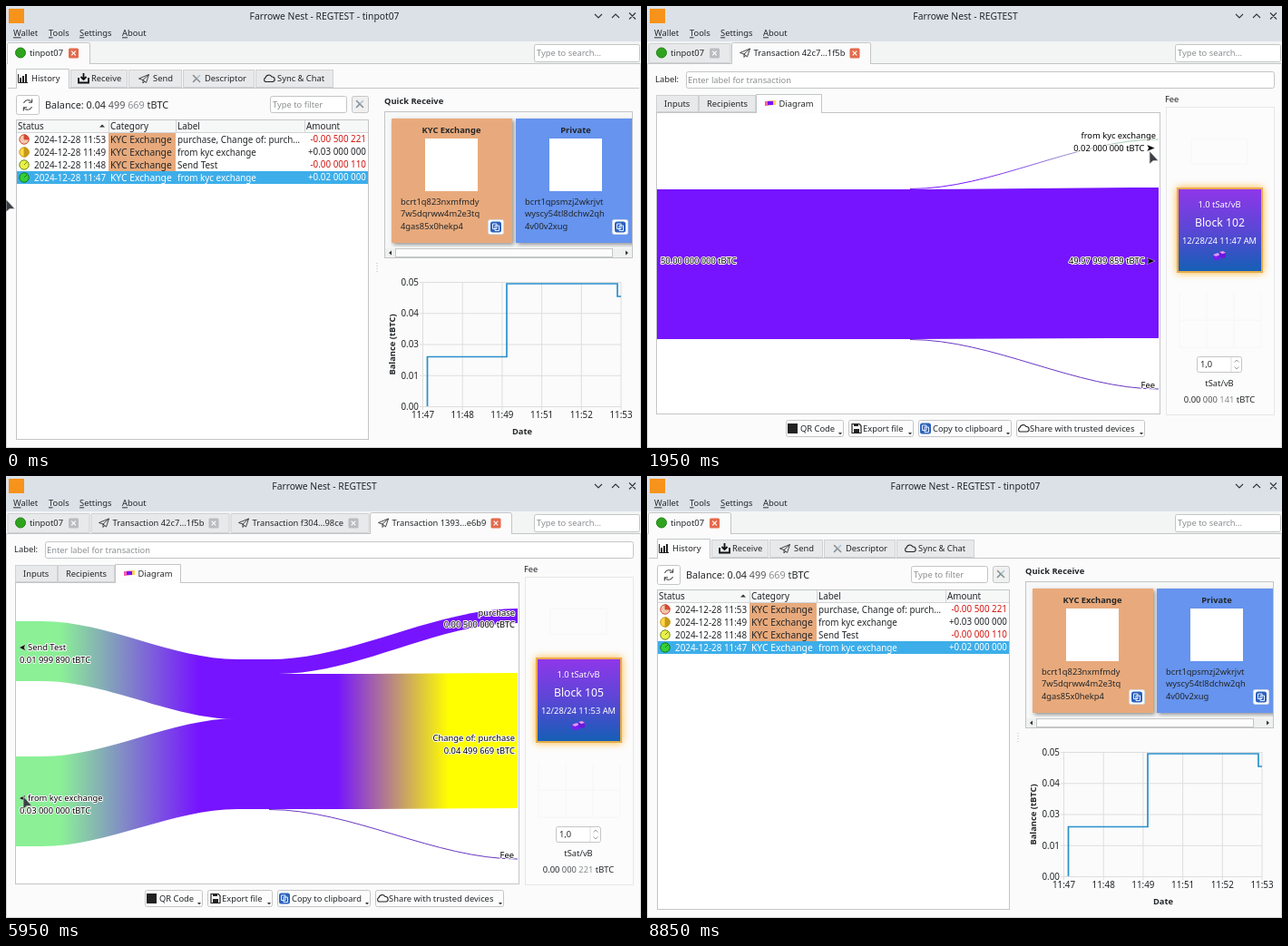
Write an HTML page that moves like this. It is 700 px wide and 487 px high and loops after 9 s.

```html
<!DOCTYPE html>
<html lang="en">
<head>
<meta charset="utf-8">
<title>Wallet walkthrough</title>
<style>
html, body { margin: 0; width: 100%; height: 100%; overflow: hidden; background: #fbfbfb }
svg { display: block }
text { font: 9.35px "Noto Sans", "Open Sans", sans-serif; fill: #232629; white-space: pre }
.m { text-anchor: middle } .e { text-anchor: end }
.b { font-weight: 700 }
.n { font-size: 9.85px } .l { font-size: 10.3px } .xl { font-size: 12.2px } .bal { font-size: 10.8px }
.g { fill: #8b8e91 } .w { fill: #fff } .r { fill: #d2140f }
.h { fill: #000; stroke: #fff; stroke-width: 2px; paint-order: stroke; stroke-linejoin: round }
.block { filter: drop-shadow(0 0 4px #ffb52e) }
.card { filter: drop-shadow(2px 2px 2px #0006) }
</style>
</head>
<body>
<svg width="700" height="487" viewBox="0 0 700 487">
  <defs>
    <linearGradient id="block" x2="0" y2="1"><stop stop-color="#9136ea"/><stop offset=".5" stop-color="#5a47d5"/><stop offset="1" stop-color="#1260b4"/></linearGradient>
    <g id="plane" fill="none" stroke="#333" stroke-width=".9" stroke-linejoin="round"><path d="M-5.500 0L5.500-4.500 2.500 4.500-1 1.500ZM-1 1.500L5.500-4.500M-1 1.500V5L.8 3"/></g>
    <g id="cubes"><path d="M-7-1L-2-3 1-1V4L-4 5-7 3Z" fill="#7a1cf0"/><path d="M-7-1L-2-3 1-1-4 1Z" fill="#d79cf5"/><path d="M0-4L4-5 7-3V2L3 3 0 1Z" fill="#6a18dc"/><path d="M0-4L4-5 7-3 3-2Z" fill="#ee9de4"/></g>
    <g id="copy"><rect x="-6" y="-6" width="12" height="12" rx="2.500" fill="#2c62bd"/><path d="M-3.500-3.500H1V2H-3.500ZM-1-1.500H3.500V4H-1Z" fill="#2c62bd" stroke="#e6eeff"/></g>
    <g id="tools" stroke-linecap="round" stroke-width="1.600"><path d="M-3.500-3.500L3.500 3.500" stroke="#8c8c8c"/><path d="M3.500-3.500L0 0" stroke="#a9c0d4"/><path d="M0 0L-3.500 3.500" stroke="#7d8c98"/></g>
    <path id="cloud" d="M-4 3.500A2.500 2.500 0 0 1-4-1A3.800 3.800 0 0 1 3-2A2.800 2.800 0 0 1 4 3.500Z" fill="none" stroke="#222" stroke-width="1.100"/>
  </defs>
  <g id="scene"></g>
  <path id="cursor" d="M0 0V14L4 10.500 9.500 10.300Z" fill="#3b3f44" stroke="#d8dadc" stroke-width=".7"/>
</svg>
<script>
const LOOP = 9000, APP = 'Farrowe Nest', WALLET = 'tinpot07';
const PAGE = '#fbfbfb', PURPLE = '#7614ff', GREEN = '#8bf096', YELLOW = '#ffff00', TAN = '#e8aa7c', EDGE = '#c3c5c7', BLUE = '#3daee9';

// [start ms, open transactions, recipients page shown]; the last open tab is active
const stages = [[0, 0], [400, 1, true], [1250, 1], [2250, 2], [4200, 3], [6100, 4], [7500, 3], [8050, 2], [8250, 1], [8450, 0]];
const pointer = [[0, 0, 213], [350, 61, 190], [500, 61, 190], [1150, 160, 105], [1300, 160, 105], [1900, 554, 160],
  [2400, 554, 160], [3150, 534, 251], [3850, 550, 250], [4850, 550, 250], [5750, 19, 353], [6950, 19, 353],
  [7400, 540, 48], [8050, 540, 48], [8220, 382, 48], [8420, 228, 48], [8800, -15, 190], [9000, -15, 190]];
const txs = [
  { id: '42c7...1f5b', x: 93, w: 154, block: 102, time: '11:47', fee: 141, draw: () => bulk('50.00 000 000', '0.02 000 000', '49.97 999 859', true) },
  { id: 'f304...98ce', x: 247, w: 154, block: 103, time: '11:48', fee: 110, draw: sendTest },
  { id: '1393...e6b9', x: 401, w: 157, block: 105, time: '11:53', fee: 221, draw: purchase },
  { id: 'a92a...101f', x: 558, w: 155, block: 104, time: '11:49', fee: 141, draw: () => bulk('49.97 999 859', '0.03 000 000', '49.94 999 718', false) }
];

// y is the vertical middle of the text
const T = (x, y, s, cls = '') => `<text x="${x}" y="${y + 3.4}" class="${cls}">${s}</text>`;
const P = (d, fill = 'none', stroke = 'none', w = 1) => `<path d="${d}" fill="${fill}" stroke="${stroke}" stroke-width="${w}"/>`;
const R = (x, y, w, h, fill, stroke = 'none', r = 0) => {
  const o = stroke == 'none' ? 0 : .5;
  return `<rect x="${x + o}" y="${y + o}" width="${w - 2 * o}" height="${h - 2 * o}" rx="${r}" fill="${fill}" stroke="${stroke}"/>`;
};
const C = (x, y, r, fill, stroke = 'none') => `<circle cx="${x}" cy="${y}" r="${r}" fill="${fill}" stroke="${stroke}"/>`;
const use = (id, x, y) => `<use href="#${id}" x="${x}" y="${y}"/>`;
const field = (x, y, w, h, edge = EDGE, fill = '#fff') => R(x, y, w, h, fill, edge, 2);
const sats = s => {
  const [a, b, c] = s.split(' ');
  return `${a} <tspan fill="#55585b">${b}</tspan> <tspan fill="#8b8e91">${c}</tspan> tBTC`;
};
const spin = (x, y, h) => P(`M${x - 6} ${y - h / 2 + 1}V${y + h / 2 - 1}`, 'none', '#ddd') +
  P(`M${x - 2.5} ${y - 2.5}L${x} ${y - 5} ${x + 2.5} ${y - 2.5}M${x - 2.5} ${y + 2.5}L${x} ${y + 5} ${x + 2.5} ${y + 2.5}`, 'none', '#999', .9);
const swoop = (x0, y0, x1, y1) => `C${(2 * x0 + x1) / 3} ${y0} ${(x0 + 2 * x1) / 3} ${y1} ${x1} ${y1}`;
const gradient = (id, from, to, x1, x2, y1 = 0, y2 = 0) =>
  `<linearGradient id="${id}" gradientUnits="userSpaceOnUse" x1="${x1}" y1="${y1}" x2="${x2}" y2="${y2}"><stop stop-color="${from}"/><stop offset="1" stop-color="${to}"/></linearGradient>`;

function closeBox(x, active) {
  return R(x - 5.5, 46.5, 11, 11, active ? '#e26b4c' : '#babdc0', 'none', 1.5) +
    P(`M${x - 2.3} 49.700l4.600 4.600m0-4.600l-4.600 4.600`, 'none', '#fff', 1.2);
}

function mainTab(x, w, active) {
  return active
    ? P(`M${x} 64V42Q${x} 40.500 ${x + 2} 40.500H${x + w - 2}Q${x + w} 40.500 ${x + w} 42V64`, PAGE, EDGE)
    : R(x, 41, w, 22, '#e8e9ea', '#cfd1d3', 1);
}

function frame(n) {
  const menus = [[8, 'Wallet'], [47, 'Tools'], [81, 'Settings'], [128, 'About']];
  let s = R(0, 0, 700, 487, PAGE) + R(0, 0, 700, 39, '#dce1e8') + R(0, 39, 700, 24, '#f3f4f4') +
    R(3, 3, 17, 16, '#f7931a') +
    T(351, 11.5, `${APP} - REGTEST${n ? '' : ' - ' + WALLET}`, 'l m') +
    P('M649 9l4 4 4-4M668 13l4-4 4 4M687 7.500l7 7m0-7l-7 7', 'none', '#333', 1.1);
  for (const [x, m] of menus) s += T(x, 30, `<tspan text-decoration="underline">${m[0]}</tspan>${m.slice(1)}`);
  s += P('M0 63.500H700', 'none', EDGE);

  const shift = n == 4 ? -155.5 : 0;
  let tabs = mainTab(1.5, 91, !n) + C(16, 51.5, 5.5, '#2fa31d', '#23861a') + T(26, 52, WALLET) + closeBox(74.5, !n);
  txs.slice(0, n).forEach((tx, i) => {
    const active = i == n - 1;
    tabs += mainTab(tx.x + .5, tx.w - 1, active) + use('plane', tx.x + 15, 51.5) +
      T(tx.x + 24.5, 52, 'Transaction ' + tx.id) + closeBox(tx.x + tx.w - 18, active);
  });
  s += `<svg width="558" height="65"><g transform="translate(${shift})">${tabs}</g></svg>`;
  if (n == 4) s += R(558, 41, 10, 21, '#f5f5f5', EDGE) + R(568, 41, 10, 21, '#f5f5f5', EDGE) + P('M565 49l-3 3 3 3ZM571 49l3 3-3 3Z', '#333');
  return s + field(582, 42, 117, 20) + T(585, 52, 'Type to search...', 'g') +
    P('M.5 63V486.500H699.500V63', 'none', '#d3d5d7');
}

function subTab(x, y, w, h, label, active, textX, icon = '') {
  return (active
    ? P(`M${x + .5} ${y + h + 1}V${y + .5}H${x + w - .5}V${y + h + 1}`, '#fdfdfd', EDGE)
    : R(x, y + 1, w, h - 1, '#e8e9ea', '#cfd1d3')) + icon + T(textX, y + h / 2 + .5, label);
}

function home() {
  let s = P('M2 90.500H698', 'none', EDGE) +
    subTab(11, 69, 59, 21, 'History', true, 28, P('M13.500 75V84.500H24', 'none', '#222') + P('M15 84V79h2v5ZM18 84V77h2v7ZM21 84V75h2v9Z', '#222')) +
    subTab(71, 69, 63, 21, 'Receive', false, 94, P('M80 79v5.500h11V79M85.500 74v7m-3-3l3 3 3-3', 'none', '#111', 1.8)) +
    subTab(135, 69, 59, 21, 'Send', false, 162, use('plane', 152, 80)) +
    subTab(195, 69, 79, 21, 'Descriptor', false, 219, use('tools', 210, 80)) +
    subTab(275, 69, 86, 21, 'Sync &amp; Chat', false, 299, use('cloud', 290, 80));
  s += field(11, 98, 26, 22) + P('M19.500 107a5 5 0 0 1 9-1M28.500 111a5 5 0 0 1-9 1M28.700 102.500v3.700H25M19.300 115.500v-3.700H23', 'none', '#333', 1) +
    T(43, 109.5, 'Balance: ' + sats('0.04 499 669'), 'bal') +
    field(291, 99, 85, 19) + T(294, 109, 'Type to filter', 'g') + field(381, 99, 19, 19, EDGE, '#f0f0f0') + use('tools', 390, 108);
  return s + history() + cards() + chart();
}

function history() {
  const rows = [['53', 'purchase, Change of: purch…', '-0.00 500 221', '#f0c8ae', '#d34a30'], ['49', 'from kyc exchange', '+0.03 000 000', '#ffd84a', '#c79a16'],
    ['48', 'Send Test', '-0.00 000 110', '#eaf04a', '#6f8a14'], ['47', 'from kyc exchange', '+0.02 000 000', '#36cf38', '#147a1c']];
  const turns = ['0-5.200A5.200 5.200 0 0 1 5.200 0', '0-5.200A5.200 5.200 0 0 1 0 5.200', '3.700-3.700', '3.700-3.700'];
  let s = R(11, 125, 389, 353, '#fff', EDGE) + R(12, 126, 387, 14, '#f6f7f7') + P('M12 139.500H399M113.500 126V140M187.500 126V140M329.500 126V140', 'none', '#d2d4d6') +
    T(13, 133, 'Status', 'n') + T(115, 133, 'Category', 'n') + T(189, 133, 'Label', 'n') + T(331, 133, 'Amount', 'n') + P('M103 133.500l3-3 3 3Z', '#333');
  rows.forEach(([minute, label, amount, light, dark], i) => {
    const y = 147 + 14 * i, on = i == 3 ? ' w' : '';
    s += i == 3 ? R(12, 182, 387, 14, BLUE) : R(113, y - 7, 74, 14, TAN);
    s += C(20, y, 5.2, light, dark) + `<g transform="translate(20 ${y})">${P('M0 0L' + turns[i] + 'Z', dark, dark, .8)}</g>` +
      T(31, y + .5, '2024-12-28 11:' + minute, 'n' + on) + T(115, y + .5, 'KYC Exchange', 'l' + on) + T(189, y + .5, label, 'n' + on) +
      T(397, y - .5, amount, 'n e' + on + (amount[0] == '-' ? ' r' : ''));
  });
  return s;
}

function cards() {
  const card = (x, color, name, lines) => `<g class="card">${R(x, 124, 133, 137, color)}</g>` + T(x + 66, 137, name, 'b m') +
    R(x + 37, 146, 58, 58, '#fff') + lines.map((l, i) => T(x + 10, 215.5 + 13.3 * i, l)).join('') +
    field(x + 106, 235, 18, 17, '#cfd8e6') + use('copy', x + 115, 243.5);
  return T(417, 104.5, 'Quick Receive', 'b') + R(417, 116, 274, 162, '#f6f7f7', EDGE) +
    `<svg x="418" y="117" width="272" height="149" viewBox="418 117 272 149">` +
    card(425, TAN, 'KYC Exchange', ['bcrt1q823nxmfmdy', '7w5dqrww4m2e3tq', '4gas85x0hekp4']) +
    card(562, '#6694ee', 'Private', ['bcrt1qpsmzj2wkrjvt', 'wyscy54tl8dchw2qh', '4v00v2xug']) + '</svg>' +
    R(418, 267, 272, 10, '#eff0f0') + R(429, 267, 240, 10, '#fcfcfc', EDGE) + P('M425 269.500v5l-3-2.500ZM683 269.500v5l3-2.500Z', '#333') +
    P('M409 283v12', 'none', '#bbb').replace('/>', ' stroke-dasharray="1 2"/>');
}

function chart() {
  let s = '';
  for (let i = 0; i < 6; i++) {
    const x = 459.5 + 43.7 * i;
    s += P(`M${x} 304V445`, 'none', '#dedede') + T(x, 451, '11:' + [47, 48, 49, 51, 52, 53][i], 'n m');
  }
  for (let i = 0; i < 5; i++) {
    const y = 304.5 + 34.25 * i;
    s += P(`M456 ${y}H678`, 'none', '#dedede') + T(455, y, '0.0' + [5, 4, 3, 1, 0][i], 'n e');
  }
  return s + P('M464.500 441V386.500H552V306H674V320H678', 'none', '#2a8fcb', 1.7) + T(569, 469, 'Date', 'b m') +
    `<g transform="translate(426 373) rotate(-90)">${T(0, 0, 'Balance (tBTC)', 'b m')}</g>`;
}

function txPage(tx, recipients) {
  const rainbow = gradient('mini', '#ff4db8', '#ffe14a', 0, 0).replace('userSpaceOnUse', 'objectBoundingBox').replace('x2="0"', 'x2="1"');
  const icon = x => rainbow + P(`M${x} 105c4 0 4-1 12-1v5c-6 0-8 1-12 1Z`, 'url(#mini)') + R(x + 3, 105, 6, 4, PURPLE);
  return T(9, 81, 'Label:') + field(43, 72, 649, 19, recipients ? BLUE : EDGE) + T(45, 81.5, 'Enter label for transaction', 'g') +
    (recipients ? P('M45.500 75V88', 'none', '#111') : '') +
    R(10, 117, 556, 333, '#fff', EDGE) +
    subTab(10, 97, 47, 20, 'Inputs', false, 19) + subTab(57, 97, 63, 20, 'Recipients', recipients, 66) +
    subTab(120, 97, 73, 20, 'Diagram', !recipients, 145.5, icon(130)) +
    (recipients ? recipientList() : tx.draw()) + feePanel(tx) + buttons();
}

function recipientList() {
  const form = (y, address, fill, amount) => T(62, y, 'Address', 'e') + field(68, y - 9, 444, 19, EDGE, fill) + T(70, y, address) +
    field(513, y - 9, 17, 18) + use('copy', 521, y) + field(531, y - 9, 18, 18) + use('cubes', 540, y) +
    T(27, y + 24, 'Label') + field(68, y + 15, 481, 19) +
    T(27, y + 48, 'Amount') + field(68, y + 40, 238, 15) + T(72, y + 48, amount) + spin(300, y + 48, 15) + T(311, y + 48, 'tBTC');
  return R(18, 146, 540, 135, '#fdfdfd', EDGE) + subTab(18, 126, 110, 20, `Wallet "${WALLET}"`, true, 43) +
    C(33.5, 133.5, 3, '#000') + P('M28 142q0-5 4-5h3q4 0 4 5Z', '#000') +
    form(164, 'bcrt1qng7kdcede2e2hkc4ctx573v4hs74g5rwjgs43j', '#8af092', '0.02 000 000') +
    R(69, 180, 83, 17, TAN, '#c98f66', 2) + T(110, 188, 'KYC Exchange', 'm') + T(155, 188, 'from kyc exchange') +
    R(18, 286, 540, 156, '#fdfdfd', EDGE) +
    form(304, 'bcrt1qau0wd2p5kg50r3glhthemxyfvfmc9q8xd2gqk3', '#fff', '49.97 999 859') + T(70, 328, 'Enter label here', 'g');
}

function feePanel(tx) {
  return T(571, 103, 'Fee') + R(572, 111, 120, 340, '#fcfcfc', '#e6e7e8') +
    P('M600 146H662V174H600ZM587 316V376H677V316M587 346H677M617 316V376M647 316V376', 'none', '#f6f6f6') +
    `<g class="block">${R(584, 200, 95, 94, 'url(#block)')}</g>` + `<rect x="585" y="201" width="93" height="92" fill="none" stroke="#f8b541" stroke-width="1.800"/>` +
    T(631, 219, '1.0 tSat/vB', 'w m') + T(631.5, 239.5, 'Block ' + tx.block, 'w m xl') + T(631, 259, `12/28/24 ${tx.time} AM`, 'w m') + use('cubes', 631, 275) +
    field(606, 386, 50, 18) + T(610, 395, '1,0') + spin(650, 395, 18) +
    T(631, 416, 'tSat/vB', 'm') + T(631, 434, sats('0.00 000 ' + tx.fee), 'm');
}

function buttons() {
  const list = [[153, 64, 'QR Code', 169, R(155, 460, 11, 11, '#222')],
    [222, 72, 'Export file', 238, P('M226 460.500h8l2 2v8h-10Z', 'none', '#222', 1.2) + P('M228 460h5v3h-5ZM228 466h6v4h-6Z', '#222')],
    [299, 103, 'Copy to clipboard', 315, use('copy', 307, 465.5)], [407, 142, 'Share with trusted devices', 422, use('cloud', 415, 465.5)]];
  return list.map(([x, w, label, tx, icon]) => field(x, 456, w, 19, EDGE, '#fcfcfc') + icon + T(tx, 465.5, label) +
    P(`M${x + w - 6} 470h4l-2 2.200Z`, '#333')).join('');
}

const rightArrow = y => P(`M551 ${y - 3.7}L560 ${y} 551 ${y + 3.7} 553 ${y}Z`, '#000', '#fff', .4);
const leftArrow = y => P(`M21.500 ${y - 3.5}L14.500 ${y} 21.500 ${y + 3.5} 20 ${y}Z`, '#000', '#fff', .4);
const rightAmount = (y, v, linked) => T(linked ? 548.5 : 561, y, v + ' tBTC', 'h e') + (linked ? rightArrow(y) : '');
const leftLabel = (y, label, v) => leftArrow(y) + T(24, y, label, 'h') + T(15, y + 13.5, v + ' tBTC', 'h');
const feeLine = (y, textY) => P('M290 367.500' + swoop(290, 367.5, 564, y), 'none', '#6a35c4') + T(560, textY, 'Fee', 'h e');

function bulk(total, sent, rest, linked) {
  return gradient('thin', PURPLE, '#a9cdb4', 360, 520) +
    P(`M11 202H290${swoop(290, 202, 564, 200)}V366${swoop(564, 366, 290, 367)}H11Z`, PURPLE) +
    P('M290 201.500' + swoop(290, 201.5, 564, 147), 'none', 'url(#thin)') + feeLine(422, 418) +
    T(15, 281, total + ' tBTC', 'h') + T(561, 143, 'from kyc exchange', 'h e') +
    rightAmount(156.5, sent, true) + rightAmount(281, rest, linked);
}

function sendTest() {
  return gradient('in', GREEN, PURPLE, 97, 205) + gradient('out', PURPLE, GREEN, 372, 464, 284, 253) +
    R(11, 202, 280, 165, 'url(#in)') +
    P('M290 202H370C405 180 430 160 480 160H564V325H482C450 350 420 367 370 367H290Z', 'url(#out)') + feeLine(408, 405) +
    leftLabel(281, 'from kyc exchange', '0.02 000 000') + T(560, 239.5, 'Send Test', 'h e') + rightAmount(253, '0.01 999 890', true);
}

function purchase() {
  const inflow = (top, bottom, top2, bottom2) =>
    P(`M11 ${top}H40${swoop(40, top, 255, top2)}H291V${bottom2}H255${swoop(255, bottom2, 40, bottom)}H11Z`, 'url(#in)');
  return gradient('in', GREEN, PURPLE, 60, 212) + gradient('out', PURPLE, YELLOW, 365, 488) +
    inflow(160, 226, 202, 268) + inflow(309, 408, 267, 367) +
    P(`M290 202${swoop(290, 202, 564, 146)}V162${swoop(564, 162, 300, 218)}H290Z`, PURPLE) +
    P(`M290 218H400L564 217V366L400 367H290Z`, 'url(#out)') + feeLine(422, 418) +
    leftLabel(189, 'Send Test', '0.01 999 890') + leftLabel(355, 'from kyc exchange', '0.03 000 000') +
    T(561, 151, 'purchase', 'h e') + rightAmount(163.5, '0.00 500 000') +
    T(561, 289, 'Change of: purchase', 'h e') + rightAmount(303, '0.04 499 669');
}

const scene = document.getElementById('scene'), cursor = document.getElementById('cursor');
let shown, start;

function render(now) {
  start ??= now;
  const time = (now - start) % LOOP;
  const stage = stages.findLast(s => s[0] <= time);
  if (stage != shown) {
    const [, n, recipients = false] = shown = stage;
    scene.innerHTML = frame(n) + (n ? txPage(txs[n - 1], recipients) : home());
  }
  const i = pointer.findIndex(p => p[0] > time);
  const [t0, x0, y0] = pointer[i - 1], [t1, x1, y1] = pointer[i];
  const u = (time - t0) / (t1 - t0), k = u * u * (3 - 2 * u);
  cursor.setAttribute('transform', `translate(${x0 + (x1 - x0) * k} ${y0 + (y1 - y0) * k})`);
  requestAnimationFrame(render);
}
requestAnimationFrame(render);
</script>
</body>
</html>
```
